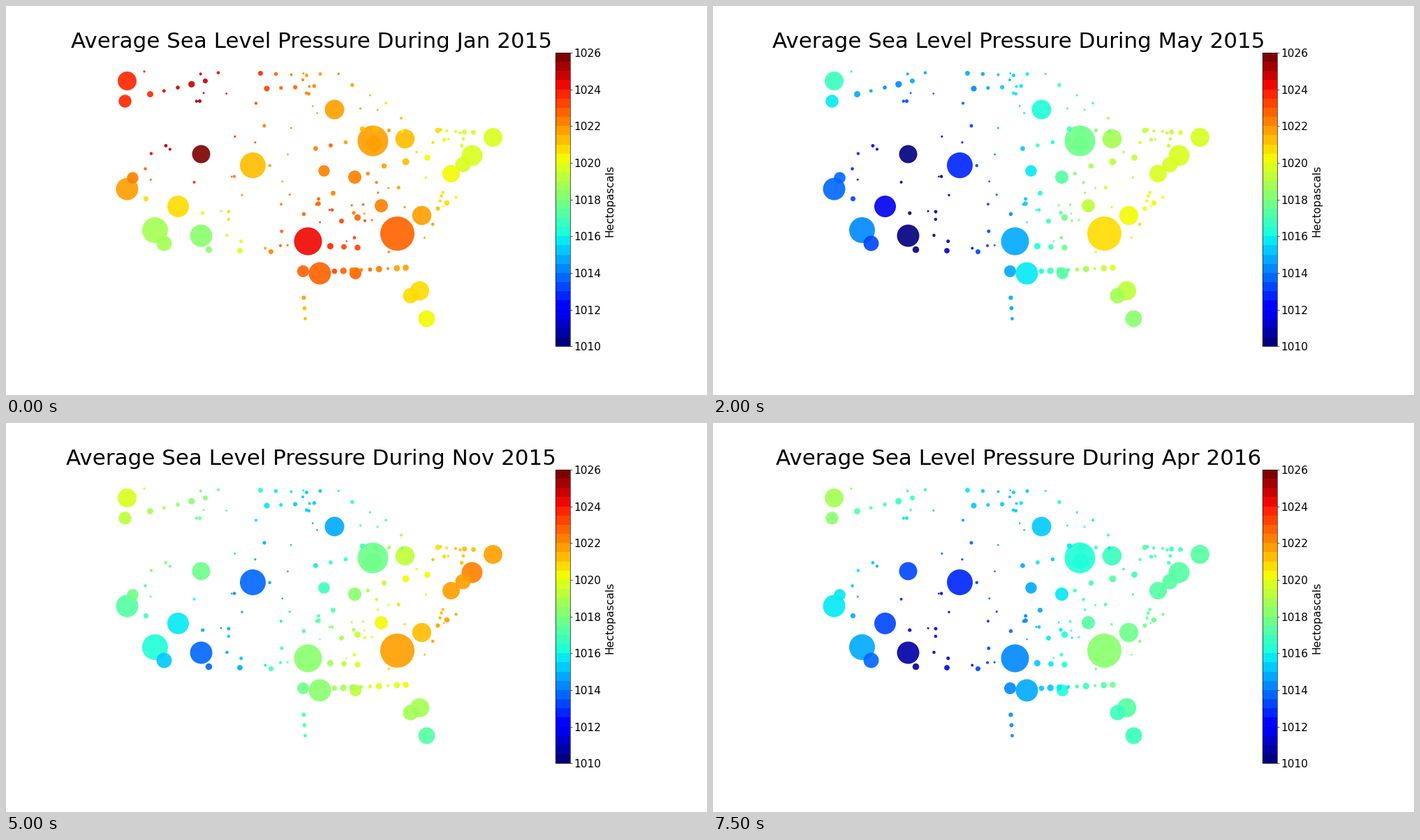
Write a matplotlib script that moves like this. It is 1004 px wide and 558 px high and loops after 8000 ms.

```python
import numpy as np
import matplotlib.pyplot as plt
from matplotlib.animation import FuncAnimation
from matplotlib.cm import ScalarMappable
from matplotlib.colors import Normalize
from matplotlib.path import Path

W, H, DPI = 1004, 558, 64
PT = 72 / DPI  # points per pixel
plt.rcParams["font.family"] = "DejaVu Sans"
rng = np.random.default_rng(7)

# Main stations: x, y, radius. The first ten anchor the pressure field.
HUBS = np.array([
    (173, 107, 13.5), (213, 321, 18.5), (279, 329, 16), (279, 212, 13),
    (353, 228, 18.5), (470, 148, 14), (432, 337, 20), (560, 326, 24.5),
    (667, 214, 15), (602, 448, 12),
    (173, 262, 16), (246, 287, 15.5), (525, 193, 22), (449, 383, 16),
    (571, 190, 13.8), (697, 188, 13.5), (595, 300, 13.7), (592, 408, 13.7),
    (637, 240, 12.5), (654, 227, 11), (579, 415, 11), (226, 340, 11),
    (526, 197, 11.5), (170, 136, 9.2), (499, 245, 9.5), (537, 286, 9.5),
    (500, 383, 8.5), (425, 380, 8.5), (181, 246, 8.3), (455, 236, 8.2),
])

# Readings above 1010 hPa at the anchors, keyed by month number
READINGS = {
    0: [13.5, 8.9, 8.3, 17, 11.2, 11.8, 14.2, 12.5, 9.5, 10.1],
    2: [10.9, 6.2, 3.9, 9.3, 7.4, 10, 9.3, 10.7, 9.7, 9.2],
    4: [6.6, 4.2, -0.5, -0.3, 2.7, 6.2, 4.8, 10.7, 9.9, 8.4],
    8: [6.8, 0.9, -0.4, 1.8, 2.2, 5.4, 4.2, 6.8, 8.5, 3.3],
    10: [9.6, 6, 3.9, 7.6, 3.9, 4.8, 8.3, 11.8, 12.2, 7.2],
    12: [4.8, 8.7, 7.3, 11.8, 6.2, 7.6, 9.4, 9.4, 6.2, 6.6],
    15: [8.8, 4.8, 0.6, 3.3, 2.7, 5.4, 4.2, 8.4, 7.1, 6.6],
}

# Rows of evenly spaced small stations: start, end, count
ROWS = [
    (470, 380, 572, 375, 9), (443, 204, 486, 195, 3), (426, 298, 468, 268, 3),
    (541, 229, 603, 217, 3), (510, 176, 567, 179, 4), (618, 178, 669, 181, 5),
    (290, 349, 379, 352, 3), (364, 96, 430, 99, 4), (373, 118, 434, 115, 4),
    (206, 126, 285, 107, 5), (464, 344, 503, 346, 3), (199, 233, 200, 276, 2),
    (480, 308, 503, 303, 2), (618, 290, 644, 274, 3), (426, 418, 428, 448, 3),
]

# Rough land outline that holds the scattered stations
LAND = Path([(162, 90), (485, 95), (570, 150), (690, 165), (635, 280),
             (590, 350), (430, 360), (335, 345), (200, 315), (155, 210)])

MONTHS = "Jan Feb Mar Apr May Jun Jul Aug Sep Oct Nov Dec".split()
N_FRAMES, N_SCATTER = 16, 85


def row_dots():
    dots = []
    for x0, y0, x1, y1, n in ROWS:
        size = rng.uniform(2, 5, n)
        dots += zip(np.linspace(x0, x1, n), np.linspace(y0, y1, n), size)
    return dots


def scatter_dots():
    """Tiny stations inside the outline, denser towards the east."""
    dots = []
    while len(dots) < N_SCATTER:
        x, y = 150 + 550 * rng.random() ** 0.7, rng.uniform(88, 360)
        gaps = np.hypot(HUBS[:, 0] - x, HUBS[:, 1] - y) - HUBS[:, 2]
        if LAND.contains_point((x, y)) and gaps.min() > 4:
            dots.append((x, y, rng.uniform(1.3, 2.8)))
    return dots


def spread_matrix(points, sites):
    """Weights that spread site readings smoothly over all points."""
    def dist(a):
        return np.linalg.norm(a[:, None] - sites[None], axis=2)

    n = len(sites)
    system = np.ones((n + 1, n + 1))
    system[:n, :n] = dist(sites)
    system[n, n] = 0
    basis = np.column_stack([dist(points), np.ones(len(points))])
    return (basis @ np.linalg.inv(system))[:, :n]


dots = np.vstack([HUBS, row_dots(), scatter_dots()])
noise = rng.normal(0, 0.25, len(dots))
noise[:len(HUBS)] = 0
order = np.argsort(-dots[:, 2], kind="stable")
dots, noise = dots[order], noise[order]

keys = list(READINGS)
table = np.array(list(READINGS.values()))
spread = spread_matrix(dots[:, :2], HUBS[:table.shape[1], :2])


def pressure(k):
    sites = [np.interp(k, keys, column) for column in table.T]
    return 1010 + spread @ sites + noise


fig = plt.figure(figsize=(W / DPI, H / DPI), dpi=DPI, facecolor="white")
ax = fig.add_axes([0, 0, 1, 1])
ax.set(xlim=(0, W), ylim=(H, 0))
ax.axis("off")

cmap = plt.get_cmap("jet", 32)
norm = Normalize(1010, 1026)
marks = ax.scatter(dots[:, 0] + 0.5, dots[:, 1] + 0.5, c=pressure(0),
                   s=(2 * dots[:, 2] * PT) ** 2, cmap=cmap, norm=norm,
                   alpha=0.91, linewidths=0)
title = ax.text(437.5, 60, "", fontsize=31 * PT, ha="center", va="baseline")

cax = fig.add_axes([787.3 / W, 1 - 488.3 / H, 21 / W, 421.3 / H])
bar = fig.colorbar(ScalarMappable(norm, cmap), cax=cax,
                   ticks=range(1010, 1027, 2))
bar.outline.set_linewidth(0.65 * PT)
cax.tick_params(labelsize=15.5 * PT, length=2.7 * PT, width=0.65 * PT,
                pad=2.7 * PT)
ax.text(865.2, 279, "Hectopascals", fontsize=15.5 * PT, rotation=90,
        ha="center", va="center")


def draw(k):
    marks.set_array(pressure(k))
    title.set_text("Average Sea Level Pressure During "
                   f"{MONTHS[k % 12]} {2015 + k // 12}")
    return marks, title


anim = FuncAnimation(fig, draw, frames=N_FRAMES, interval=500,
                     init_func=lambda: draw(0), repeat=True, repeat_delay=0)
plt.show()
```
